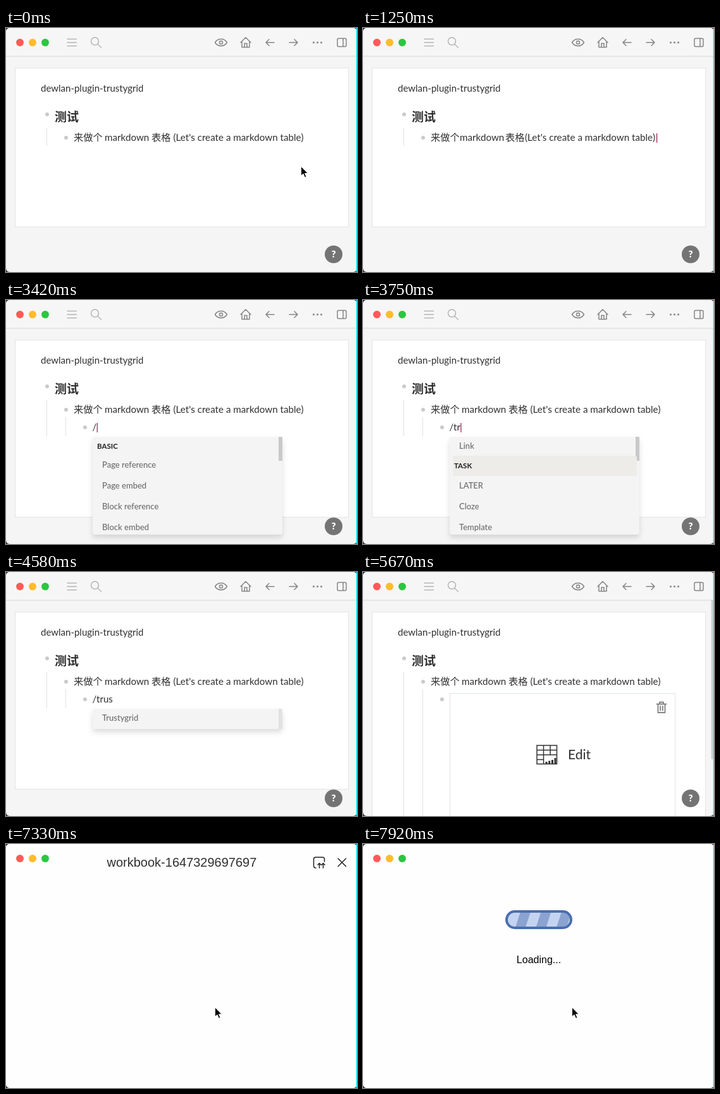
Recreate the animation shown at these times as an HTML page. Size 555 by 387 pixels, loop 8000 ms.

```html
<!DOCTYPE html>
<html lang="en">
<head>
<meta charset="utf-8">
<title>Notes with a table block</title>
<style>
  html, body { margin: 0; width: 100%; height: 100%; overflow: hidden; background: #333; }
  svg { display: block; width: 555px; height: 387px; }
  text { font: 15px Lato, "Noto Sans CJK SC", "Noto Sans CJK", sans-serif; fill: #303030; white-space: pre; }
  .line { font-size: 15.2px; }
  .head { font-size: 19px; font-weight: 700; }
  .item { font-size: 13px; font-weight: 500; fill: #6c6c6c; }
  .group { font-size: 11.5px; font-weight: 700; fill: #222; }
  .sheet { font-family: "Liberation Sans", Arial, sans-serif; }
  .icon { fill: none; stroke: #858585; stroke-width: 1.5; stroke-linecap: round; stroke-linejoin: round; }
  .pale { stroke: #b4b4b4; }
  .bullet { fill: #cacaca; }
  .guide { stroke: #e2e2e2; }
  .card { fill: #fff; stroke: #e4e4e4; }
  .menu { fill: #f4f4f4; filter: drop-shadow(0 5px 4px #0002); }
</style>
</head>
<body>
<svg viewBox="0 0 555 387">
  <defs>
    <pattern id="stripes" width="32.5" height="40" patternUnits="userSpaceOnUse">
      <path fill="#c4d4f0" d="M0 0h32.5v40H0z"/>
      <path fill="#8aa3d0" d="M0 0h16v40H0z"/>
    </pattern>
    <clipPath id="window"><rect width="555" height="387" rx="6"/></clipPath>
    <path id="beamShape" fill="none" d="M-3-7.500q3 0 3 2.500q0-2.500 3-2.500M0-5v10M-3 7.500q3 0 3-2.500q0 2.500 3 2.500M-1.500 2h3"/>
  </defs>

  <g clip-path="url(#window)">
    <rect width="555" height="387" fill="#f5f5f5"/>

    <!-- page card -->
    <rect class="card" x="14.5" y="63.5" width="527" height="252" data-on="0-1920"/>
    <rect class="card" x="14.5" y="63.5" width="527" height="281" data-on="1920-5670"/>
    <rect class="card" x="14.5" y="63.5" width="527" height="400" data-on="5670-8000"/>
    <path class="guide" d="M64.5 158v29" data-on="0-1920"/>
    <path class="guide" d="M64.5 158v58M94.5 186v30" data-on="1920-5670"/>
    <path class="guide" d="M64.5 158v229M94.5 186v201" data-on="5670-8000"/>

    <text x="55" y="101">dewlan-plugin-trustygrid</text>
    <circle class="bullet" cx="65" cy="137" r="3"/>
    <text class="head" x="77" y="147.5">测试</text>
    <circle class="bullet" cx="95" cy="174" r="3"/>
    <text class="line" y="179" data-on="0-920 1920-8000"><tspan x="107">来做个</tspan><tspan x="156">markdown</tspan><tspan x="230">表格</tspan><tspan x="264.5">(Let's create a markdown table)</tspan></text>
    <text class="line" y="179" data-on="920-1920"><tspan x="107">来做个</tspan><tspan x="153">markdown</tspan><tspan x="225">表格</tspan><tspan x="256">(Let's create a markdown table)</tspan></text>
    <path stroke="#a3174f" stroke-width="1.2" d="M464.6 167v15" data-on="920-1420"/>

    <!-- table block -->
    <g data-on="5670-8000">
      <path id="selection" fill="#bbe3ff" d="M95 188h406v199H95z"/>
      <rect x="137.5" y="192.5" width="356" height="220" fill="#fff" stroke="#dfe3e6"/>
      <path class="icon" style="stroke-width:1.9" d="M464.500 209.500h15M469 209v-2.500h6v2.500M466.500 210v13h11v-13M470.200 213v6.500M473.800 213v6.500"/>
      <path fill="none" stroke="#333" stroke-width="1.5" d="M275 275h31.500v29.500H275zM275 282.500h31.500M275 290h31.500M275 297.500h10.500M285.500 275v29.500M296 275v15"/>
      <path stroke="#333" stroke-width="3" d="M290 304v-3M294.700 304v-4.500M299.400 304v-6M304 304v-9"/>
      <text x="324" y="297" style="font-size:21px">Edit</text>
    </g>
    <circle class="bullet" cx="125" cy="202" r="3" data-on="1920-8000"/>

    <!-- line being edited -->
    <text id="typed" x="136.500" y="207"></text>
    <path id="caret" stroke="#a3174f" stroke-width="1.2" d="M0 195v15" data-on="1920-2080 2500-3080 3170-4500 4670-5420"/>

    <!-- command menu -->
    <g data-on="3420-3920">
      <rect class="menu" x="137" y="217" width="300" height="155" rx="4"/>
      <path fill="#c9c9c9" d="M431 217h6v38h-6z"/>
    </g>
    <g data-on="3420-3580">
      <text class="group" x="144" y="236">BASIC</text>
      <text class="item" x="152" y="266">Page reference</text>
      <text class="item" x="152" y="299">Page embed</text>
      <text class="item" x="152" y="332">Block reference</text>
      <text class="item" x="152" y="365">Block embed</text>
    </g>
    <g data-on="3580-3920">
      <rect x="142" y="247" width="291" height="32" rx="3" fill="#edece8"/>
      <text class="item" x="152" y="236">Link</text>
      <text class="group" x="144" y="267">TASK</text>
      <text class="item" x="152" y="299">LATER</text>
      <text class="item" x="152" y="332">Cloze</text>
      <text class="item" x="152" y="365">Template</text>
    </g>
    <g data-on="3920-4670">
      <rect class="menu" x="137" y="217" width="300" height="32" rx="4"/>
      <path fill="#e2e2e2" d="M431 217h4q2 0 2 3v26q0 3-2 3h-4z"/>
      <text class="item" x="152" y="236">Trustygrid</text>
    </g>

    <!-- toolbar -->
    <path fill="#f6f6f6" d="M0 0h555v44H0z"/>
    <path stroke="#dedede" d="M0 44.500h555"/>
    <path stroke="#ececec" d="M0 45.500h555"/>
    <path class="icon pale" d="M97 17.500h14.500M97 23h14.500M97 28.500h14.500"/>
    <path class="icon pale" d="M145 26l5.500 5"/>
    <circle class="icon pale" cx="140.500" cy="21" r="6"/>
    <path class="icon" d="M330.500 23c4.500-7.300 14.500-7.300 19 0c-4.500 7.300-14.500 7.300-19 0z"/>
    <circle class="icon" cx="340" cy="23" r="2.500"/>
    <path class="icon" d="M371 23l8-8 8 8M373 21.500v9h12v-9M377 30.500v-6h4v6"/>
    <path class="icon" d="M424 23h-13M416 18l-5 5 5 5M448 23h13M456 18l5 5-5 5"/>
    <path class="icon" style="stroke-width:3" d="M486.500 23h.01M492.500 23h.01M498.500 23h.01"/>
    <path class="icon" d="M526 16.500h10q2 0 2 2v9q0 2-2 2h-10q-2 0-2-2v-9q0-2 2-2zM533 16.500v13"/>
    <rect x="550.500" y="44" width="3.500" height="253" rx="1.700" fill="#cfcfcf" data-on="5670-7330"/>

    <!-- help button -->
    <circle cx="518" cy="359" r="14" fill="#747474"/>
    <text x="518" y="363.700" text-anchor="middle" style="font-weight:900;font-size:15px;fill:#fff">?</text>

    <!-- workbook editor -->
    <path fill="#fefefe" d="M0 0h555v387H0z" data-on="7330-8000"/>
    <g data-on="7330-7500">
      <text class="sheet" x="159.500" y="36" style="font-size:20px">workbook-1647329697697</text>
      <g class="icon" style="stroke:#222">
        <path d="M490 38q-3.500 0-3.500-3.500V24q0-3 3-3h11q3 0 3 3v4"/>
        <path d="M495.500 38v-7M493 33l2.500-2.500 2.500 2.500M501.500 38v-7M499 33l2.500-2.500 2.500 2.500"/>
        <path d="M525 23l12.500 12.500M537.500 23L525 35.500"/>
      </g>
    </g>
    <g data-on="7500-8000">
      <rect x="227" y="107" width="102" height="26" rx="13" fill="url(#stripes)" stroke="#4a6fae" stroke-width="4"/>
      <text class="sheet" x="278" y="189" text-anchor="middle" style="font-size:16px;fill:#000">Loading...</text>
    </g>

    <circle cx="22" cy="23" r="6" fill="#fc5b57"/>
    <circle cx="42" cy="23" r="6" fill="#fdbb2f"/>
    <circle cx="62" cy="23" r="6" fill="#29c740"/>

    <!-- pointers -->
    <path id="arrow" stroke="#fff" d="M0 0v15l3.500-3.200 2.500 5.700 2.500-1.100-2.500-5.400h4.800z"/>
    <g id="beam">
      <use href="#beamShape" stroke="#fff" stroke-width="3"/>
      <use href="#beamShape" stroke="#111" stroke-width="1.2"/>
    </g>
  </g>
  <path fill="#00f4ff" d="M553.700 0h1.300v387h-1.300z"/>
</svg>

<script>
const LOOP = 8000;
const [typed, caret, selection, stripes, arrow, beam] =
  ['typed', 'caret', 'selection', 'stripes', 'arrow', 'beam'].map(id => document.getElementById(id));

const typing = [
  [0, ''], [3170, '/'], [3580, '/t'], [3670, '/tr'], [3920, '/tru'], [4080, '/trus'],
  [4670, ''], [4920, '{{renderer :trustygrid, workbook-1647329697697}}'], [5670, '']
];

// time, x, y, pointer shape
const pointer = [
  [0, 466.5, 219.5, arrow], [420, 471, 208, arrow], [500, 481, 181, arrow], [580, 487, 164.5, beam],
  [1250, 0, 0, null], [6580, 465.5, 175, beam], [6750, 455, 192, arrow], [6830, 424, 213, arrow],
  [6920, 376, 243, arrow], [7000, 342, 258, arrow], [7080, 330.5, 259, arrow]
];

const timed = [...document.querySelectorAll('[data-on]')].map(node => ({
  node,
  ranges: node.dataset.on.split(' ').map(range => range.split('-').map(Number))
}));

const latest = (steps, t) => steps.findLast(step => step[0] <= t);
const show = (node, visible) => { node.style.display = visible ? '' : 'none'; };

function draw(t) {
  for (const { node, ranges } of timed) {
    show(node, ranges.some(([start, end]) => t >= start && t < end));
  }

  const text = latest(typing, t)[1];
  if (typed.textContent !== text) typed.textContent = text;
  const width = text ? typed.getComputedTextLength() : 0;
  caret.setAttribute('transform', `translate(${137.5 + width})`);

  selection.style.opacity = t < 5920 || t >= 7080 ? 0 : t < 6000 ? 0.6 : 1;

  const [, x, y, shape] = latest(pointer, t);
  for (const node of [arrow, beam]) {
    show(node, node === shape);
    node.setAttribute('transform', `translate(${x} ${y})`);
  }

  const shift = 23.9 + (t - 7920) * 0.0325;
  stripes.setAttribute('patternTransform', `translate(${shift}) skewX(-18)`);
}

function tick() {
  draw(performance.now() % LOOP);
  requestAnimationFrame(tick);
}
tick();
</script>
</body>
</html>
```
